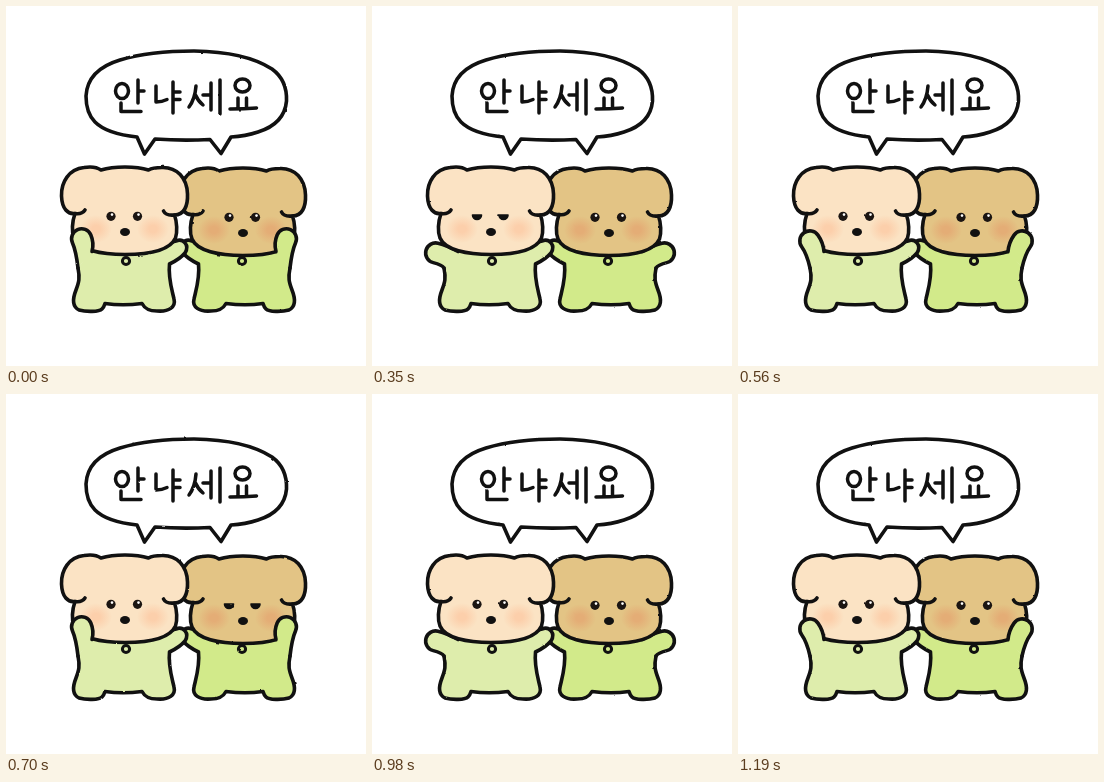
Animation of 360 by 360 pixels, one loop 1.26 s. Source, as an HTML page:

```html
<!DOCTYPE html>
<html lang="ko">
<head>
<meta charset="utf-8">
<style>
html, body { margin: 0; width: 100%; height: 100%; overflow: hidden; background: #fff; }
svg { display: block; width: 100vw; height: 100vh; }
.ink { stroke: #111; stroke-width: 3.6; stroke-linecap: round; stroke-linejoin: round; }
.line { fill: none; }
</style>
</head>
<body>
<svg viewBox="0 0 360 360">
  <defs>
    <filter id="rough" filterUnits="userSpaceOnUse" x="0" y="0" width="360" height="360" color-interpolation-filters="sRGB">
      <feTurbulence id="noise" type="fractalNoise" baseFrequency=".13" numOctaves="2" seed="1"/>
      <feDisplacementMap in="SourceGraphic" scale="1.6" xChannelSelector="R" yChannelSelector="G"/>
    </filter>
  </defs>
  <rect width="360" height="360" fill="#fff"/>
  <g filter="url(#rough)">
    <g id="dogs"></g>
    <path class="ink" fill="#fff" d="M80,90 C81,72 94,60 114,54 C137,47 162,45 188,45 C221,45.5 249,52 266,63 C277,71 281,82 280.5,95 C279,112 268,121 252,126 C243,129 234,130.500 225,131 L215,147.500 L204,133.500 Q176,135 149,133 L138.500,148 L131,131 C112,129 98,125 89,116 C82,109 80,100 80,90Z"/>
    <g class="ink line" style="stroke-width:3.500" role="img" aria-label="안냐세요">
      <ellipse cx="116" cy="85" rx="6.500" ry="7.500"/>
      <path d="M132,74 V97 M132,85 H138 M115,97 V105.500 H135"/>
      <path d="M150,80 V96 Q156,96 161,93.500 M167,76 V107 M167,86 H174 M167,93.500 H174"/>
      <path d="M190,80 Q189,93 183,101 M189.500,89 Q192,95 197,99 M197,89 H204 M205,77 V104 M214,74 V108"/>
      <ellipse cx="236.500" cy="79.500" rx="7.500" ry="6.500"/>
      <path d="M232,92 V102 M240.500,92 V102 M224,103 Q238,103 250.500,102"/>
    </g>
  </g>
</svg>
<script>
const STEP = 70, STEPS = 18, WAVE = 9;
const NS = "http://www.w3.org/2000/svg";

function add(parent, tag, attrs) {
  const el = document.createElementNS(NS, tag);
  for (const key in attrs) el.setAttribute(key, attrs[key]);
  return parent.appendChild(el);
}

const TORSO = "M72,262 C74,272 73,276 70,284 C66,294 67,301 73,304 C80,306 93,306 96,303 Q98,301 99,297.5 " +
  "C110,299 124,299 136,297.5 C139,303 143,305 151,305 C163,306 170,301 168,293 " +
  "C166,284 162,272 163.5,258 Q174,253 179,247 C184,239 177,232 170,235 L158,238 H90";
const HEAD = "M95,164 C90,160.5 84,160.5 78,161.5 C63,163 55,176 55.5,190 C56,203 62,208.5 69,207.5 " +
  "C66,216 65.5,226 68,232 C73,244 95,248.5 119,248.5 C143,248.5 164,244 169.5,232 " +
  "C171.5,226 171,216 168.5,209 C178,209 182,200 181.5,188 C181,172 171,161 156,161.5 " +
  "C149,161.5 145,162.5 142.5,164 C130,160 108,160 95,164Z";

function makeDog({ id, shift, flip, fur, cheek, suit, blinkFrom }) {
  const dog = add(document.getElementById("dogs"), "g", {});
  const mirror = flip ? "matrix(-1 0 0 1 356 0)" : "";

  const body = add(dog, "g", { transform: mirror });
  add(body, "path", { class: "ink", fill: suit, d: TORSO });
  add(body, "circle", { class: "ink", fill: suit, cx: 120, cy: 255, r: 3.6, style: "stroke-width:3" });

  const head = add(dog, "g", { transform: `translate(${shift})` });
  const blush = add(head, "radialGradient", { id });
  add(blush, "stop", { offset: 0.25, "stop-color": cheek });
  add(blush, "stop", { offset: 1, "stop-color": cheek, "stop-opacity": 0 });
  add(head, "path", { class: "ink", fill: fur, d: HEAD });
  for (const cx of [90, 147]) add(head, "ellipse", { cx, cy: 223, rx: 16, ry: 14, fill: `url(#${id})` });
  add(head, "path", { class: "ink line", d: "M69,207.5 Q76,208.5 79,204 M168.5,209 Q160,210 157.5,205" });
  add(head, "ellipse", { fill: "#111", cx: 119, cy: 226, rx: 5, ry: 4 });

  const open = add(head, "g", {}), shut = add(head, "g", {});
  for (const x of [105, 131.5]) {
    add(open, "circle", { cx: x, cy: 210.3, r: 4.6, fill: "#1b1512" });
    add(open, "circle", { cx: x + 1, cy: 208.6, r: 1.3, fill: "#fff" });
    add(shut, "path", { class: "ink", fill: "#111", style: "stroke-width:1.6", d: `M${x - 4.5},209 H${x + 4.5} A4.5,4.5 0 0 1 ${x - 4.5},209Z` });
  }

  const arm = add(dog, "path", { class: "ink", fill: suit, transform: mirror });
  return { dog, head, arm, open, shut, blinkFrom };
}

// Arm outline for a given lift in degrees above horizontal
function armPath(lift) {
  const a = lift * Math.PI / 180, cos = Math.cos(a), sin = Math.sin(a);
  const reach = 21, r = 10, bend = 9;
  const x = 84 - reach * cos, y = 252 - reach * sin;
  const lowX = x - r * sin, lowY = y + r * cos;
  const topX = x + r * sin, topY = y - r * cos;
  return `M72,262 Q${lowX + bend * cos},${lowY + bend * sin} ${lowX},${lowY} ` +
    `A${r},${r} 0 0 1 ${topX},${topY} Q${topX + bend * cos},${topY + bend * sin} 86,245.5`;
}

// The right dog sits behind the left one
const dogs = [
  { id: "blushB", shift: "118 1", flip: true, fur: "#e3c485", cheek: "#e4ad76", suit: "#d2ea8a", blinkFrom: 10 },
  { id: "blushA", shift: "0 0", flip: false, fur: "#fbe3c4", cheek: "#fccfab", suit: "#deedac", blinkFrom: 3 }
].map(makeDog);
const noise = document.getElementById("noise");

function draw(ms) {
  const step = Math.floor(ms / STEP) % STEPS;
  const lift = 41 + 27 * Math.cos((step - 0.5) * 2 * Math.PI / WAVE);
  const shape = armPath(lift);
  for (const d of dogs) {
    d.arm.setAttribute("d", shape);
    // A raised arm passes in front of the face
    d.dog.insertBefore(d.arm, lift > 45 ? null : d.head);
    const blink = step >= d.blinkFrom && step < d.blinkFrom + 4;
    d.open.setAttribute("display", blink ? "none" : "inline");
    d.shut.setAttribute("display", blink ? "inline" : "none");
  }
  noise.setAttribute("seed", 1 + step % 3);
}

const start = performance.now();
function tick() {
  draw(performance.now() - start);
  requestAnimationFrame(tick);
}
tick();
</script>
</body>
</html>
```
